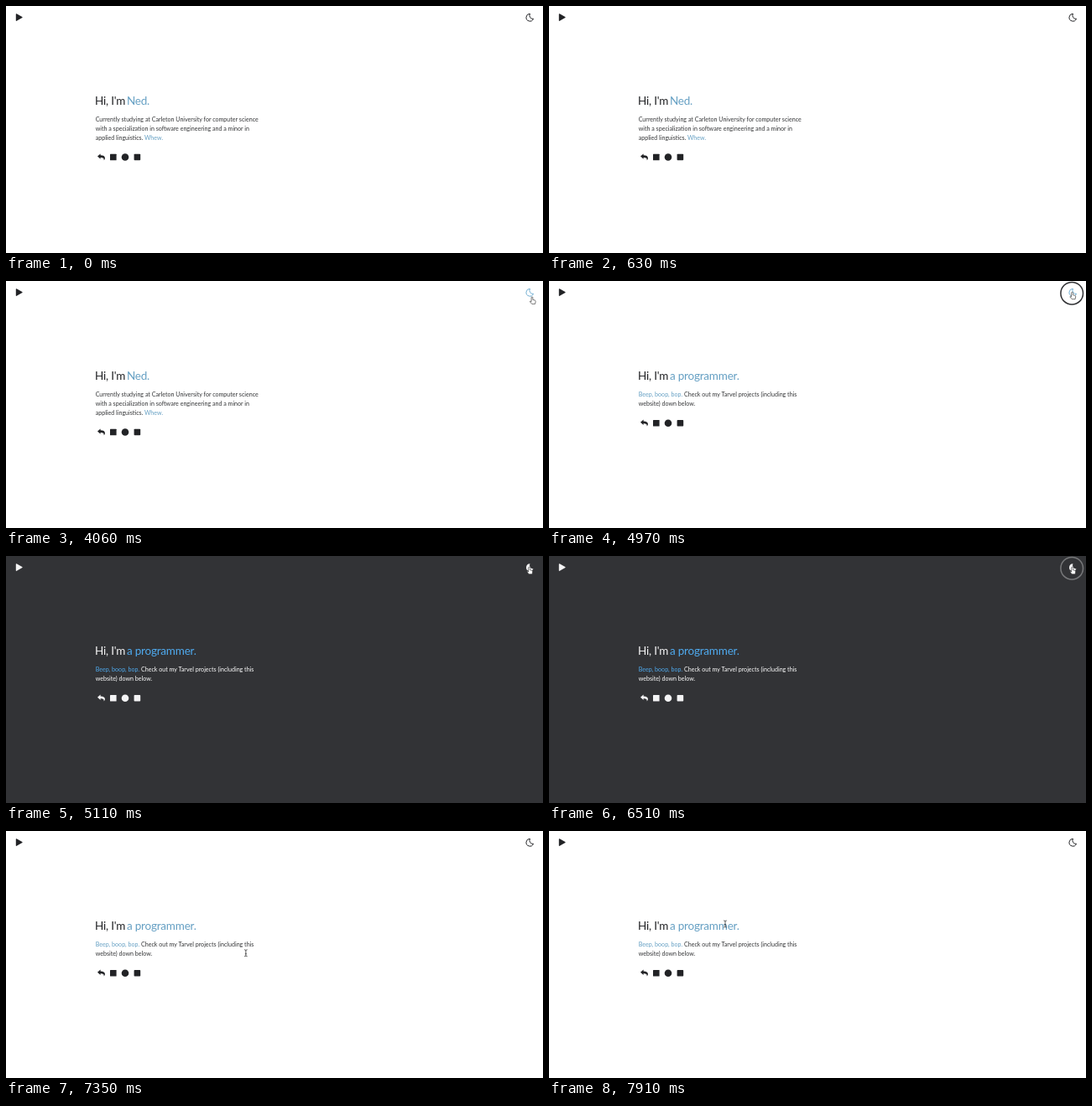
Write an HTML page that moves like this. It is 640 px wide and 295 px high and loops after 8000 ms.

```html
<!DOCTYPE html>
<html lang="en">
<head>
<meta charset="utf-8">
<title>Personal page</title>
<style>
html, body { margin: 0; height: 100%; overflow: hidden; }
svg {
  --bg: #fff; --ink: #222326; --body: #333436; --accent: #649fc3; --ring: #303134;
  display: block; width: 100%; height: 100%;
  background: var(--bg); font: 7.1px Lato, "Open Sans", sans-serif;
}
svg.dark { --bg: #323336; --ink: #f4f4f5; --body: #fff; --accent: #4fabf0; --ring: #77787a; }
text { fill: var(--body); }
.title { font-size: 13.5px; letter-spacing: -.2px; fill: var(--ink); }
.accent { fill: var(--accent); }
.icon { fill: var(--ink); }
#ring { fill: none; stroke: var(--ring); stroke-width: 1.5; }
#moon { fill: none; stroke: var(--ink); stroke-linejoin: round; }
#moon.hover { stroke: #71aed2; }
.dark #moon { fill: var(--ink); stroke: none; }
</style>
</head>
<body>
<svg id="stage" viewBox="0 0 640 295">
  <path class="icon" d="M11.8 9.8q0-1 .9-.5l6.6 3.7q.8.5 0 1l-6.6 3.8q-.9.4-.9-.5z"/>
  <path id="moon" d="M624.5 9.3a4.4 4.4 0 1 0 4 6a4 4 0 0 1-4-6z"/>
  <circle id="ring" cx="623.2" cy="14.7" r="13.3"/>

  <text class="title" x="106" y="117.6">Hi, I'm</text>
  <g id="intro">
    <text class="title accent" x="143.9" y="117.6">Ned.</text>
    <text x="106.7" y="138.4">Currently studying at Carleton University for computer science</text>
    <text x="106.7" y="149.2">with a specialization in software engineering and a minor in</text>
    <text x="106.7" y="159.8">applied linguistics. <tspan class="accent">Whew.</tspan></text>
  </g>
  <g id="coder">
    <text class="title accent" x="143.9" y="117.6">a programmer.</text>
    <text x="106.7" y="138.4"><tspan class="accent">Beep, boop, bop.</tspan> Check out my Tarvel projects (including this</text>
    <text x="106.7" y="149.2">website) down below.</text>
  </g>

  <g id="links" class="icon">
    <path d="M109 -.9L112.6 -4.1V-2.3C116 -2.3 118 -1.2 118 1.4Q118 2.8 116.5 3.8C117.2 1.3 115.8 .5 112.6 .5V2.3Z"/>
    <rect x="124" y="-3.8" width="7.6" height="7.6" rx=".5"/>
    <circle cx="142" r="4.3"/>
    <rect x="152.6" y="-3.8" width="7.6" height="7.6" rx=".8"/>
  </g>

  <g id="cursor">
    <path id="arrow" d="M0 0V6.6L1.5 5.3L2.6 7.8L3.8 7.3L2.7 4.9H4.7Z" fill="#111" stroke="#fff" stroke-width=".5"/>
    <path id="hand" d="M-.9 5V.9a.9.9 0 0 1 1.8 0V3.4l2.4.6q1 .3 .9 1.5L3.6 8.4H-.3L-2.7 5.5q.6-1.1 1.8.2Z" fill="#fff" stroke="#222" stroke-width=".6"/>
    <path id="beam" d="M-1.8-4Q0-4 0-3Q0-4 1.8-4M0-3V3M-1.8 4Q0 4 0 3Q0 4 1.8 4M-1 1H1" fill="none" stroke="#333" stroke-width=".8"/>
  </g>
</svg>
<script>
const $ = id => document.getElementById(id);
const show = (id, opacity) => $(id).setAttribute("opacity", +opacity);
const move = (id, x, y) => $(id).setAttribute("transform", `translate(${x} ${y})`);
const clamp = v => Math.max(0, Math.min(1, v));
const ramp = (t, from, to) => clamp((t - from) / (to - from));
const ease = k => k * (2 - k);

const LOOP = 8000, STEP = 70;
const entry = { x: 532, y: 283 };
const moves = [
  { from: 2800, to: 3080, x: 603, y: 49 },
  { from: 3290, to: 4060, x: 627, y: 19 },
  { from: 4130, to: 4200, x: 623.5, y: 13.3 },
  { from: 6860, to: 7140, x: 306, y: 155 },
  { from: 7280, to: 7910, x: 210, y: 111 }
];

function pointer(t) {
  let { x, y } = entry;
  for (const m of moves) {
    const k = ease(ramp(t, m.from, m.to));
    x += (m.x - x) * k;
    y += (m.y - y) * k;
  }
  return [x, y];
}

function draw(now) {
  const t = Math.floor(now % LOOP / STEP) * STEP;
  const during = (from, to) => t >= from && t < to;
  const [x, y] = pointer(t);
  const hover = x > 614 && y < 28;
  const text = x < 298;

  $("stage").classList.toggle("dark", during(5110, 6650));
  $("moon").classList.toggle("hover", hover);
  show("ring", during(4970, 5110) || during(6440, 6650));

  show("intro", 1 - ramp(t, 4340, 4620));
  show("coder", ramp(t, 4550, 4830));
  move("links", 0, t < 4620 ? 180.5 : 169.7);

  show("cursor", t >= moves[0].from);
  move("cursor", x, y);
  show("hand", hover);
  show("beam", text);
  show("arrow", !hover && !text);
}

function tick() {
  draw(performance.now());
  requestAnimationFrame(tick);
}
tick();
</script>
</body>
</html>
```
